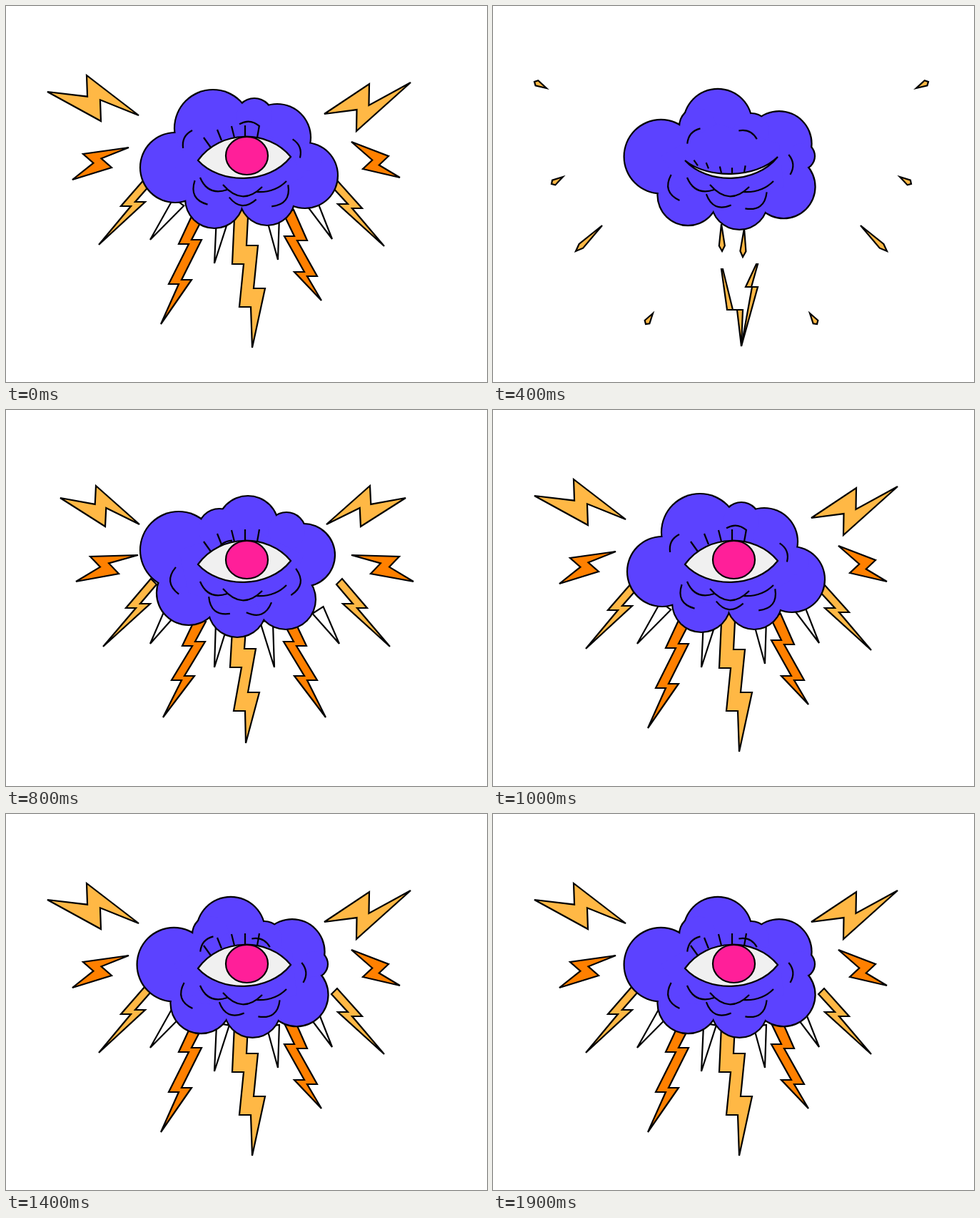
An HTML page with a canvas for the animation above (2 s loop, 674 px wide and 526 px high).

```html
<!DOCTYPE html>
<html lang="en">
<head>
<meta charset="utf-8">
<title>Storm eye</title>
<style>
  html, body { margin: 0; width: 100%; height: 100%; overflow: hidden; background: #fff; }
  canvas { display: block; }
</style>
</head>
<body>
<canvas id="stage" width="674" height="526"></canvas>
<script>
const ctx = document.getElementById('stage').getContext('2d');
const STEP = 100, STEPS = 20;
const WHITE = '#fff', PURPLE = '#5c42ff', AMBER = '#ffb845', ORANGE = '#ff8000', PINK = '#ff1f99';
const CENTER = [335, 228];

const mix = (a, b, k) => a + (b - a) * k;
const mixAll = (a, b, k) => a.map((v, i) => mix(v, b[i], k));
const add = ([x, y], [dx, dy], k = 1) => [x + dx * k, y + dy * k];
const scaleAbout = (keys, origin, k) => keys.map(p => mixAll(origin, p, k));
const mirror = (keys, axis) => keys.map(([x, y]) => [2 * axis - x, y]);
const unit = ([x0, y0], [x1, y1]) => {
  const d = Math.hypot(x1 - x0, y1 - y0);
  return [(x1 - x0) / d, (y1 - y0) / d];
};

// Shapes: each turns a few key points, outer tip first, into a polygon.
const spike = ([tip, base]) => {
  const [x, y] = unit(tip, base);
  return [tip, add(base, [-y, x], 9), add(base, [y, -x], 9)];
};

const zig = ([tip, peak, end, low]) => {
  const mid = mixAll(peak, low, 0.5);
  const gap = [(tip[0] - end[0]) * 0.07, (tip[1] - end[1]) * 0.07];
  return [tip, add(mid, gap), peak, end, add(mid, gap, -1), low];
};

// A ribbon that jumps sideways at every joint between its base and its tip.
const bolt = ({ side, lift = 3, width = 10, jump = 14, base = [4, 4] }) => ([tip, ...joints]) => {
  const left = [], right = [];
  const half = [width, -lift * side], shift = [jump * side, 0];
  joints.reverse().forEach((p, i) => {
    const h = i ? half : [base[0], base[1] * side];
    left.push(add(p, h, -1));
    right.push(add(p, h));
    if (i) {
      left.push(add(left[left.length - 1], shift));
      right.push(add(right[right.length - 1], shift));
    }
  });
  return [...left, tip, ...right.reverse()];
};

const dart = ([point, end]) => {
  const [x, y] = unit(point, end), belly = mixAll(point, end, 0.8);
  return [point, add(belly, [-y, x], 4), end, add(belly, [y, -x], 4)];
};

// The rising pose is symmetric; the resting pose leans its own way on each side.
const parts = [];
function pair(fill, shapes, axis, rise, restLeft, restRight) {
  parts.push({ fill, shape: shapes[0], rise, rest: restLeft });
  parts.push({ fill, shape: shapes[1], rise: mirror(rise, axis), rest: restRight });
}
const both = options => [bolt({ side: 1, ...options }), bolt({ side: -1, ...options })];

pair(WHITE, [spike, spike], 334.5, [[202, 327], [232, 280]], [[202, 327], [242, 274]], [[457, 326], [425, 269]]);
pair(WHITE, [spike, spike], 334, [[292, 360], [303, 295]], [[292, 360], [304, 294]], [[381, 355], [374, 296]]);
pair(AMBER, [zig, zig], 318, [[76, 123], [126, 106], [187, 160], [139, 163]],
  [[58, 120], [113, 97], [186, 153], [133, 161]], [[567, 107], [509, 109], [446, 151], [491, 175]]);
pair(ORANGE, [zig, zig], 334.5, [[98, 240], [118, 205], [185, 203], [158, 229]],
  [[93, 243], [108, 207], [172, 198], [148, 226]], [[552, 240], [536, 210], [484, 190], [500, 228]]);
pair(AMBER, both({}), 337, [[136, 331], [178, 274], [207, 240]],
  [[130, 334], [171, 277], [199, 245]], [[530, 336], [489, 280], [460, 248]]);
pair(ORANGE, both({ width: 9, base: [7, 3] }), 334, [[220, 430], [241, 375], [256, 327], [273, 293]],
  [[217, 445], [237, 386], [251, 330], [269, 293]], [[442, 412], [427, 375], [413, 325], [396, 288]]);
parts.push({
  fill: AMBER,
  shape: bolt({ side: 1, lift: 13, jump: 16, base: [9.5, 0] }),
  rise: [[336, 466], [329, 408], [324, 347], [327, 300]],
  rest: [[345, 478], [337, 408], [327, 348], [330, 286]]
});

// What is left of the bolts after the burst.
const outerDarts = [
  [[75, 115], [58, 106]], [[98, 239], [82, 249]], [[153, 307], [116, 343]], [[224, 430], [214, 445]]
];
const shards = [
  ...outerDarts, ...outerDarts.map(d => mirror(d, 334)),
  [[320, 305], [321, 343]], [[352, 311], [350, 351]]
].map(dart);
const thin = { width: 4, lift: 0, base: [1, 0] };
shards.push(bolt({ side: 1, ...thin })([[348, 476], [332, 425], [321, 368]]));
shards.push(bolt({ side: 1, ...thin, jump: 9 })([[348, 476], [358, 393], [370, 361]]));

// Big puffs [x, y, r] follow one closed track, two keys apart.
const track = [
  [237, 226, 49], [256, 256, 45], [292, 270, 41], [324, 277, 41], [366, 268, 39], [392, 265, 42],
  [419, 237, 46], [417, 203, 44], [380, 184, 47], [339, 163, 43], [290, 171, 54], [242, 196, 54]
];
// Small puffs slip across the top behind them, half as far per key.
const topTrack = [
  [432, 210, 19], [424, 212, 20], [400, 190, 20], [393, 170, 27], [362, 176, 26],
  [348, 155, 26], [323, 159, 30], [299, 168, 30], [287, 168, 26]
];

function along(u) {
  const i = Math.floor(u), t = u - i;
  const [a, b, c, d] = [-1, 0, 1, 2].map(k => track[(i + k + track.length) % track.length]);
  return b.map((v, n) => v + t / 2 * (c[n] - a[n] +
    t * (2 * a[n] - 5 * v + 4 * c[n] - d[n] + t * (3 * (v - c[n]) + d[n] - a[n]))));
}

function polygon(pts, fill) {
  ctx.beginPath();
  for (const [x, y] of pts) ctx.lineTo(x, y);
  ctx.closePath();
  ctx.fillStyle = fill;
  ctx.fill();
  ctx.stroke();
}

function curve(from, control, to) {
  ctx.beginPath();
  ctx.moveTo(...from);
  ctx.quadraticCurveTo(...control, ...to);
  ctx.stroke();
}

function drawBolts(step) {
  if (step === 4 || step === 5) {
    for (const pts of shards) {
      polygon(step === 4 ? pts : scaleAbout(scaleAbout(pts, pts[0], 0.5), CENTER, 1.035), AMBER);
    }
    return;
  }
  for (const { fill, shape, rise, rest } of parts) {
    if (step === 3 && fill === WHITE) continue;
    const settle = step < 6 ? 1 : Math.min(1, Math.max(0, (step - 8) / 2));
    let pts = shape(rise.map((p, i) => mixAll(p, rest[i], settle)));
    if (step < 4) pts = scaleAbout(pts, rest[0], Math.min(1, 1.25 - step / 4));
    else if (step < 8) pts = scaleAbout(pts, CENTER, (step - 4) / 4);
    polygon(pts, fill);
  }
}

// A fold sits just inside the point where two neighbouring puffs meet.
function drawFold([x0, y0, r0], [x1, y1, r1]) {
  const d = Math.hypot(x1 - x0, y1 - y0), [ux, uy] = unit([x0, y0], [x1, y1]);
  const a = (d * d + r0 * r0 - r1 * r1) / (2 * d), h = Math.sqrt(Math.max(0, r0 * r0 - a * a));
  const foot = [x0 + ux * a, y0 + uy * a];
  const away = ([x, y]) => Math.hypot(x - CENTER[0], y - CENTER[1]);
  const [joint] = [-h, h].map(k => add(foot, [-uy, ux], k)).sort((p, q) => away(q) - away(p));
  const out = unit(CENTER, joint);
  const [half, sag] = out[1] > 0 ? [19, 10] : [14, 5];
  const mid = add(joint, out, -4 - 13 * Math.abs(out[0]));
  const inner = add(mid, out, -sag), across = [-out[1], out[0]];
  curve(add(inner, across, -half), add(mid, out, sag), add(inner, across, half));
}

function drawCloud(phase) {
  const shift = Math.max(phase / 4, (phase - 1) / 2);
  const big = [0, 2, 4, 6, 8, 10].map(i => along(i + shift));
  const small = [-3, 1, 5].map(i => i + shift * 2)
    .filter(u => u >= 0 && u <= topTrack.length - 1)
    .map(u => mixAll(topTrack[Math.floor(u)], topTrack[Math.ceil(u)], u % 1));
  for (const [color, grow] of [['#000', 1.1], [PURPLE, -1.1]]) {
    ctx.fillStyle = color;
    for (const [x, y, r] of [...big, ...small]) {
      ctx.beginPath();
      ctx.arc(x, y, r + grow, 0, Math.PI * 2);
      ctx.fill();
    }
  }
  ctx.beginPath();
  for (const [x, y] of big) ctx.lineTo(x, y);
  ctx.fill();
  big.forEach((puff, i) => drawFold(puff, big[(i + 1) % big.length]));
  curve([272, 240], [283, 266], [310, 257]);
  curve([304, 250], [331, 281], [359, 253]);
  curve([350, 260], [376, 262], [393, 245]);
}

function drawEye(shut) {
  const lid = mix(172.5, 242, shut);
  ctx.beginPath();
  ctx.moveTo(269, 216);
  ctx.bezierCurveTo(300, lid, 368, lid, 399, 211);
  ctx.bezierCurveTo(368, 250, 300, 250, 269, 216);
  ctx.closePath();
  ctx.fillStyle = '#f0f0f0';
  ctx.fill();
  ctx.stroke();
  if (shut < 1) {
    ctx.save();
    ctx.clip();
    ctx.beginPath();
    ctx.ellipse(337.5, 209.5, 29.5, 26.5, 0, 0, Math.PI * 2);
    ctx.fillStyle = PINK;
    ctx.fill();
    ctx.stroke();
    ctx.restore();
  }
  const lashes = [[277, 184, 287, 198], [296, 173, 302, 188], [316, 168, 320, 184], [335, 167, 335, 183], [355, 167, 352, 184]];
  for (const [x0, y0, x1, y1] of lashes) {
    const drop = 52 * shut * (1 - ((x1 - 335) / 67) ** 2);
    const root = [x1, y1 + drop];
    ctx.beginPath();
    ctx.moveTo(...root);
    ctx.lineTo(...add(root, [x0 - x1, y0 - y1], 1 - 0.45 * shut));
    ctx.stroke();
  }
}

function draw(now) {
  const step = Math.floor(now / STEP) % STEPS;
  ctx.fillStyle = WHITE;
  ctx.fillRect(0, 0, 674, 526);
  ctx.strokeStyle = '#000';
  ctx.lineWidth = 2.2;
  ctx.miterLimit = 4;
  drawBolts(step);
  drawCloud(step % 5);
  drawEye(Math.max(0, 1 - Math.abs(step - 4) / 4));
}

const start = performance.now();
function tick() {
  draw(performance.now() - start);
  requestAnimationFrame(tick);
}
tick();
</script>
</body>
</html>
```
